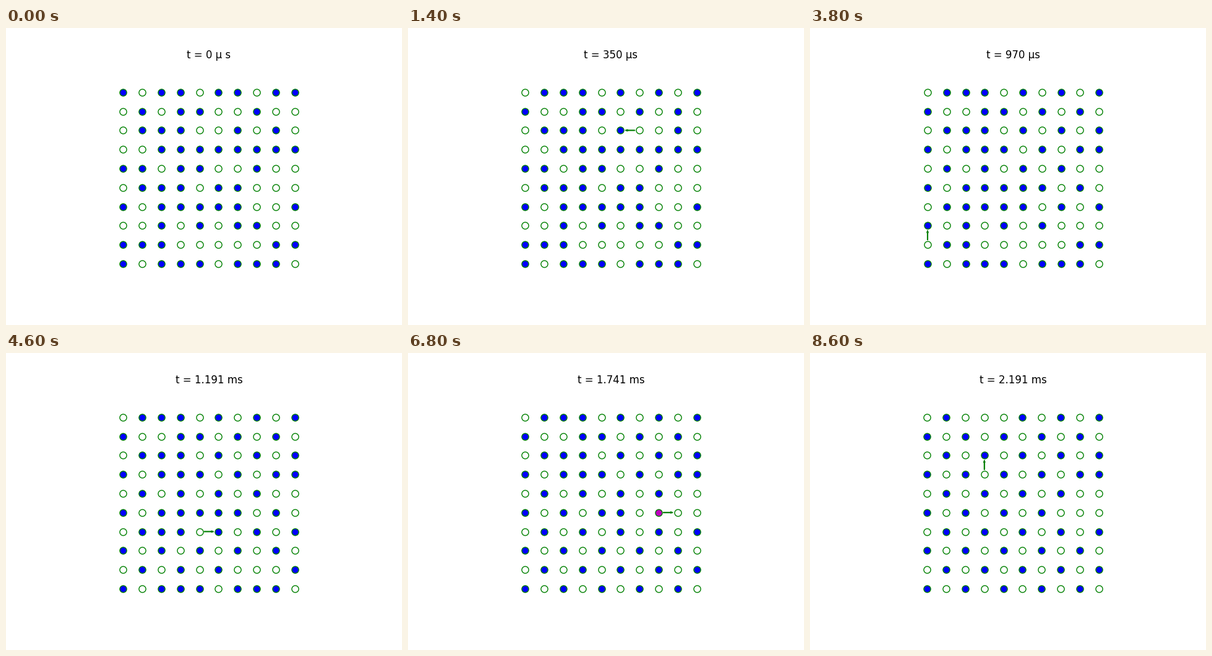
Recreate the animation shown at these times as a matplotlib script. Size 640x480 px, loop 8.8 s.

```python
import math

import matplotlib.pyplot as plt
from matplotlib.animation import FuncAnimation
from matplotlib.patches import FancyArrow

N = 10
GREEN, BLUE, FAILED, LOST = "g", "b", "y", "m"
START = """
1011011011
0101100100
0111001010
0011111111
1101100100
0111011000
1011111001
0010101100
1110000011
1011101110
""".split()

# One entry per step: "row col > row col", several moves separated by spaces.
# Suffix y: the atom stays behind; suffix m: the atom is lost.
# No target: dropped at the edge; row ^: pushed out above the top row.
STEPS = """
00>01|06>07|11>10|02>12y|17>16|08>18|26>25
37>27|28>29|40>30|35>45|39>49y
51>50|44>54|56>58|66>56|60>61|77>67|80>70
88>78|82>83|65>85|64>65|97>87
61>60|50m 60m|52>51 62>61|51>50|53>52|93m
58>59|59m|56>57|57>58m|55>56
03m|02>^2m|22>12|13>03|03>^3m|23>13|13>03m|33>23
""".replace("\n", "|").strip("|").split("|")


def site(code):
    row = -1 if code[0] == "^" else int(code[0])
    return int(code[1]), N - 1 - row


def simulate():
    atoms = {(c, N - 1 - r) for r, row in enumerate(START)
             for c, bit in enumerate(row) if bit == "1"}
    scenes = [(0.0, dict.fromkeys(atoms, BLUE), [])]
    clock = 0.0
    for step in STEPS:
        shown, arrows, reach = {}, [], 1
        gone = set()
        for move in step.split():
            mark = move[-1] if move[-1] in "ym" else ""
            path = [site(code) for code in move.rstrip("ym").split(">")]
            src, dst = path[0], path[-1]
            if src != dst:
                arrows.append((src, dst))
                reach = max(reach, math.dist(src, dst))
            if mark:
                shown[src] = mark
                if mark == LOST:
                    gone.add(src)
            else:
                atoms.discard(src)
                atoms.add(dst)
        clock += 50 * math.sqrt(reach)
        scenes.append((clock, {**dict.fromkeys(atoms, BLUE), **shown}, arrows))
        atoms -= gone
    return scenes


def label(clock):
    if clock == 0:
        return "t = 0 µ s"
    if clock < 1000:
        return f"t = {int(clock)} µs"
    return f"t = {clock / 1000:.3f} ms"


GAP, WIDTH, HEAD = 0.25, 0.025, 0.08
PAD, ASPECT = 1.5, 496 / 369.6

scenes = simulate()
fig = plt.figure(figsize=(6.4, 4.8), dpi=100)
ax = fig.add_subplot()


def arrow_extent(src, dst):
    """Bounds of the drawn arrow: shortened at both ends, head width across."""
    spans = []
    for a, b in zip(src, dst):
        if a == b:
            spans.append((a - HEAD / 2, a + HEAD / 2))
        else:
            d = math.copysign(GAP, b - a)
            spans.append(tuple(sorted((a + d, b - d))))
    return spans


def fit_view(arrows):
    xs, ys = [0, N - 1], [0, N - 1]
    for src, dst in arrows:
        x_span, y_span = arrow_extent(src, dst)
        xs.extend(x_span)
        ys.extend(y_span)
    bottom, top = min(ys) - PAD, max(ys) + PAD
    center = (min(xs) + max(xs)) / 2
    half = (top - bottom) * ASPECT / 2
    ax.set_xlim(center - half, center + half)
    ax.set_ylim(bottom, top)


def draw_arrow(src, dst):
    (x0, y0), (x1, y1) = src, dst
    length = math.dist(src, dst)
    ux, uy = (x1 - x0) / length, (y1 - y0) / length
    size = length - 2 * GAP
    ax.add_patch(FancyArrow(x0 + GAP * ux, y0 + GAP * uy, size * ux, size * uy,
                            width=WIDTH, head_width=HEAD,
                            head_length=1.5 * HEAD,
                            length_includes_head=True, color=GREEN))


def draw_sites(points, fill):
    if points:
        x, y = zip(*points)
        ax.plot(x, y, "o", ms=8, mfc=fill, mec=GREEN, mew=1)


def update(frame):
    clock, atoms, arrows = scenes[frame]
    ax.clear()
    ax.axis("off")
    ax.set_title(label(clock))
    grid = [(x, y) for x in range(N) for y in range(N)]
    draw_sites([p for p in grid if p not in atoms], "none")
    for color in (BLUE, FAILED, LOST):
        draw_sites([p for p in grid if atoms.get(p) == color], color)
    for src, dst in arrows:
        draw_arrow(src, dst)
    fit_view(arrows)
    return []


anim = FuncAnimation(fig, update, frames=len(scenes), init_func=lambda: [],
                     interval=200, repeat=True, repeat_delay=0)
plt.show()
```
